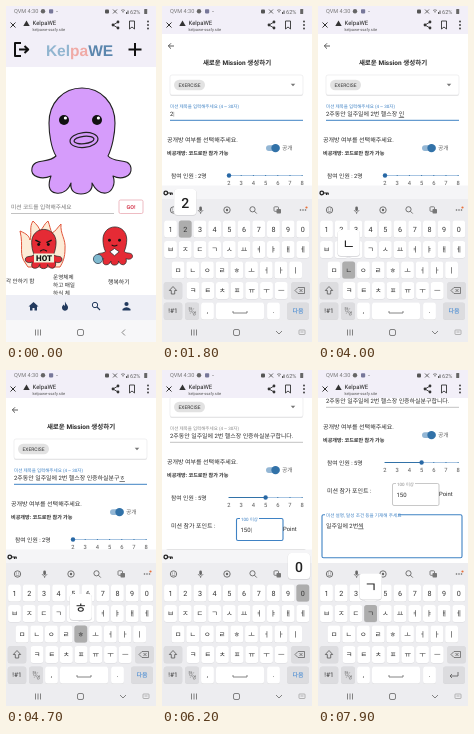
An HTML page that plays this animation: 150 by 336 pixels, repeating every 8000 ms.

```html
<!DOCTYPE html>
<html lang="ko">
<head>
<meta charset="utf-8">
<title>KelpaWE</title>
<style>
html, body { margin: 0; width: 100%; height: 100%; overflow: hidden; background: #fff; }
svg { display: block; width: 100vw; height: 100vh; }
text { font-family: Roboto, "Noto Sans CJK KR", "Noto Sans CJK", sans-serif; white-space: pre; text-rendering: geometricPrecision; }
</style>
</head>
<body>
<svg id="stage" viewBox="0 0 150 336"></svg>
<script>
const LOOP = 8000, TICK = 100;
const BLUE = '#3f82c4', NAVY = '#223a5e', GREY = '#8a8a8a', INK = '#2a2a2a';
const BAR = '#f2eff8', PANEL = '#ededf0', FUNC = '#dcdcdf';
const stage = document.getElementById('stage');

// Drawing helpers
const text = (x, y, size, str, fill = INK, extra = '') =>
  `<text x="${x}" y="${y}" font-size="${size}" fill="${fill}" ${extra}>${str}</text>`;
const mid = (x, y, size, str, fill, extra = '') => text(x, y, size, str, fill, 'text-anchor="middle" ' + extra);
const rect = (x, y, w, h, fill, r = 0, extra = '') =>
  `<rect x="${x}" y="${y}" width="${w}" height="${h}" rx="${r}" fill="${fill}" ${extra}/>`;
const dot = (x, y, r, fill, extra = '') => `<circle cx="${x}" cy="${y}" r="${r}" fill="${fill}" ${extra}/>`;
const line = (d, color = INK, w = 1, fill = 'none') =>
  `<path d="${d}" stroke="${color}" stroke-width="${w}" fill="${fill}" stroke-linejoin="round"/>`;
const shape = (d, fill) => `<path d="${d}" fill="${fill}"/>`;
const group = (x, y, body, scale = 1) => `<g transform="translate(${x} ${y}) scale(${scale})">${body}</g>`;
const BOLD = 'font-weight="700"';

// Hangul typing, one step per key press
const INITIAL = 'ㄱㄲㄴㄷㄸㄹㅁㅂㅃㅅㅆㅇㅈㅉㅊㅋㅌㅍㅎ';
const VOWEL = 'ㅏㅐㅑㅒㅓㅔㅕㅖㅗㅘㅙㅚㅛㅜㅝㅞㅟㅠㅡㅢㅣ';
const FINAL = ' ㄱㄲㄳㄴㄵㄶㄷㄹㄺㄻㄼㄽㄾㄿㅀㅁㅂㅄㅅㅆㅇㅈㅊㅋㅌㅍㅎ';

function keyPresses(str) {
  const out = [];
  let done = '';
  for (const ch of str) {
    const c = ch.charCodeAt(0) - 0xAC00;
    if (c < 0) out.push({ text: done + ch, key: ch });
    else {
      const first = INITIAL[Math.floor(c / 588)], last = c % 28;
      out.push({ text: done + first, key: first });
      out.push({ text: done + String.fromCharCode(0xAC00 + c - last), key: VOWEL[Math.floor(c % 588 / 28)] });
      if (last) out.push({ text: done + ch, key: FINAL[last] });
    }
    done += ch;
  }
  return out;
}

const script = parts => parts.map(([from, to, str]) => ({ from, to, keys: keyPresses(str) }));
const TITLE = script([
  [1800, 2500, '2주동안'],
  [2700, 4000, ' 일주일에 2번 헬스장 인'],
  [4100, 5000, '증하실분구합니다.']
]);
const POINTS = script([[5900, 6200, '150']]);
const DETAIL = script([[6800, 7900, '일주일에 2번씩']]);

function typed(t, parts) {
  let value = '', key = '';
  for (const p of parts) {
    if (t < p.from) break;
    const n = Math.floor(Math.min(1, (t - p.from) / (p.to - p.from)) * (p.keys.length - 1) + 1e-6);
    value += p.keys[n].text;
    key = t <= p.to ? p.keys[n].key : '';
  }
  return { value, key };
}

// A typed value with either its composing mark or a caret
function entry({ value, key }, focused) {
  if (!focused || !value) return value;
  return /[ㄱ-힣]/.test(key)
    ? value.slice(0, -1) + `<tspan text-decoration="underline">${value.slice(-1)}</tspan>`
    : value + '<tspan font-weight="300">|</tspan>';
}

function ramp(t, from, to) {
  const p = Math.max(0, Math.min(1, (t - from) / (to - from)));
  return p * p * (3 - 2 * p);
}

function browserBar() {
  return rect(0, 0, 150, 28, BAR) +
    text(8, 7.4, 5.6, 'QVM 4:30', '#777') + dot(37, 5.3, 2.2, '#666') + rect(43, 3.2, 4.2, 4.2, '#779', .8) +
    dot(51, 5.5, .6, '#777') +
    rect(99, 3.4, 4, 4.2, '#555', 1) + line('M107 3.5l4 4M111 3.5l-4 4', '#555', .9) +
    line('M115 4.5q2 -1.5 4 0M116 6q1 -.7 2 0', '#555', .7) + shape('M120 8v-2h1v2zM121.5 8v-3.5h1V8z', '#555') +
    text(124, 7.5, 5.6, '62%', '#666') + rect(138.2, 3, 3, 5, '#666', .6) +
    line('M4.5 16.5l5 5M9.5 16.5l-5 5', '#333', 1) +
    shape('M20.5 14.5l3.2 5.5h-6.4z', '#333') +
    text(26.5, 19, 6, 'KelpaWE', '#222') + text(26.5, 25, 4, 'kelpawe-ssafy.site', '#555') +
    line('M112 16l-5 3l5 3', '#333', .9) + dot(112, 16, 1.4, '#333') + dot(107, 19, 1.4, '#333') + dot(112, 22, 1.4, '#333') +
    line('M123.5 15h5v8l-2.5 -2l-2.5 2z', '#333', .9) +
    [15.5, 19, 22.5].map(y => dot(142, y, .9, '#333')).join('');
}

function systemBar(keyboard) {
  return rect(0, 314.5, 150, 21.5, keyboard ? PANEL : '#f7f7f9') +
    line('M29.5 323.5v6M32 323.5v6M34.5 323.5v6', '#666', .8) +
    rect(71.5, 323.5, 6, 6, 'none', 1.5, 'stroke="#666" stroke-width=".8"') +
    line(keyboard ? 'M114 325l3 3l3 -3' : 'M119 323.5l-3 3l3 3', '#666', .8) +
    (keyboard ? rect(137, 324, 6, 4.5, 'none', .6, 'stroke="#999" stroke-width=".7"') + line('M138.5 326h3', '#999', .7) : '');
}

// Body is centred on 0,0
const OCTO = 'M-25 15C-30 7-32-8-32-18C-32-38-18-53 1-53C20-53 34-38 34-18C34-7 31 7 27 15' +
  'C34 23 48 16 50 27C51 36 40 39 32 35C35 43 31 51 25 52C17 53 13 46 11 42C12 49 7 53 0 53' +
  'C-7 53-11 49-10 42C-13 50-19 53-25 52C-33 51-33 43-30 35C-39 39-51 36-49 27C-47 17-33 23-25 15Z';

function octo(x, y, scale, fill, face) {
  return group(x, y, line(OCTO, '#222', scale < 1 ? 2 : 1.1, fill) + face, scale);
}

function home() {
  const eye = x => dot(x, -21, 5, '#111') + dot(x + 1.4, -23, 1.6, '#fff');
  const ring = (rx, ry) => `<ellipse rx="${rx}" ry="${ry}" fill="none" stroke="#222" stroke-width="1.2"/>`;
  const calm = eye(-17) + eye(16) + `<g transform="translate(3 -1) rotate(-6)">${ring(14, 7.5) + ring(10, 3.7)}</g>`;
  const angry = line('M-22-24l14 7M22-24l-14 7', '#111', 4) + dot(-13, -12, 4, '#111') + dot(13, -12, 4, '#111') +
    line('M-9 6q9 -8 18 0', '#111', 3);
  const happy = dot(-14, -16, 4, '#111') + dot(14, -16, 4, '#111') + line('M-8 -3q8 6 16 0', '#111', 3) +
    line('M-13 16l13 -9l13 9l-13 11z', '#222', 2, '#fff');
  const flame = 'M20 258C12 248 18 241 14 225C21 228 23 230 24 234C26 227 23 221 27 215C31 219 33 221 34 225' +
    'C38 221 38 218 42 215C44 220 44 223 46 227C50 225 51 222 55 218C54 228 60 233 59 243C59 251 57 256 54 261H22Z';
  const word = [['Kel', '#91b5d0'], ['pa', '#f0aaa6'], ['WE', '#5b86ad']]
    .map(([s, c]) => `<tspan fill="${c}">${s}</tspan>`).join('');
  return rect(0, 28, 150, 33, BAR) + line('M15 37H9v13h6M13 43.5h9M18.5 40l3.7 3.5l-3.7 3.5', '#111', 2) +
    mid(73.5, 50, 15.5, word, INK, BOLD + ' style="font-family:\'Liberation Sans\',sans-serif"') +
    line('M129 37v13M122.5 43.5h13', '#111', 2) +
    octo(75, 135, 1, '#d69cfb', calm) +
    text(5, 202.5, 5.7, '미션 코드를 입력해주세요', '#777') + line('M5 207.5H108', '#999', .6) +
    rect(113, 194, 24, 13.5, '#fff', 1.5, 'stroke="#e7a0aa" stroke-width=".7"') + mid(125, 202.8, 5.4, 'GO!', '#d43a50', BOLD) +
    line(flame, '#e2553b', 1, '#fdebd6') + octo(37.5, 243, .37, '#e52b35', angry) +
    rect(28, 247.5, 20, 9, '#eef3dc') + mid(38, 255, 8, 'HOT', '#111', 'font-weight="900"') +
    octo(108.5, 240, .36, '#e52b35', happy) + dot(92, 253, 4.6, '#7fb9cf', 'stroke="#345" stroke-width=".8"') +
    text(0, 277, 5.6, '각 안하기 함') + text(47, 273, 5.6, '운영체제') + text(47, 281, 5.6, '하고 매일') +
    text(47, 289, 5.6, '하식 체') + text(102, 277.5, 5.9, '행복하기') +
    rect(0, 289, 150, 25.5, '#eeeff6') +
    shape('M27.5 296l-5 4.5h1.5v4h2.5v-2.5h2v2.5h2.500v-4h1.500z', NAVY) +
    shape('M59 295.5c1 3 3.500 4 3 6.500c-.5 3.500-5.500 3.500-6 0c-.2-2 1-2.500 1.500-3.500c.5 1 .8 1.200 1.200 1.200c.7-1.500 0-2.700 .3-4.200z', NAVY) +
    dot(89, 299, 2.7, 'none', `stroke="${NAVY}" stroke-width="1"`) + line('M91 301l3 3', NAVY, 1.1) +
    dot(120.5, 298, 2.1, NAVY) + shape('M116.5 304.5v-1.5q4 -3.500 8 0v1.5z', NAVY);
}

function form(t, f) {
  const people = t < 5100 ? 2 : Math.min(5, 3 + Math.floor((t - 5100) / 100));
  const shift = 42 * ramp(t, 5300, 5600) + 35 * ramp(t, 6250, 6550);
  const on = name => f.focus === name;
  const tint = name => on(name) ? BLUE : GREY;
  const knob = 67 + (people - 2) * 12.2;
  const hint = '미션 제목을 입력해주세요 (4 ~ 30자)';
  const about = '미션 설명, 달성 조건 등을 기재해 주세요';
  const outline = (name, y, box) =>
    rect(...box, '#fff', 1.5, `stroke="${on(name) ? BLUE : '#b0b0b0'}" stroke-width="${on(name) ? 1.1 : .7}"`);
  let s = line('M12 40H6.5M9 37.3l-2.7 2.7l2.7 2.7', '#333', .8) +
    mid(75, 59, 6.5, '새로운 Mission 생성하기', INK, BOLD) +
    rect(8, 70, 133, 20, '#e3e3e5', 2) + rect(8, 69, 133, 20, '#fff', 2, 'stroke="#e6e6e8" stroke-width=".6"');
  if (t >= 600) s += rect(12, 73.8, 31, 10.4, '#e2e2e2', 5.2) + mid(27.5, 80.8, 4.9, 'EXERCISE', '#333');
  s += shape('M128.7 77.8h4.6l-2.3 2.5z', t < 1300 ? BLUE : '#777');
  s += on('title') || f.title.value
    ? text(8, 101.7, 4.5, hint, tint('title')) + text(8, 110.4, 5.95, entry(f.title, on('title')))
    : text(8, 109, 5.95, hint, GREY);
  s += line('M8 114.3H141', on('title') ? BLUE : '#999', on('title') ? 1 : .6) +
    text(5, 136.2, 6, '공개방 여부를 선택해주세요.') +
    text(5, 149, 5.1, '비공개방: 코드로만 참가 가능', INK, BOLD) +
    rect(104, 139.2, 14, 5.8, '#94b7d5', 2.9) + dot(113.5, 142.1, 4.2, '#3272a8') + text(120, 144.3, 5.8, '공개', '#666') +
    text(9, 172.2, 5.8, `참여 인원 : ${people}명`) +
    line('M67 169.5H140.2', '#9fbfdf', .9) + line(`M67 169.5H${knob}`, '#3272a8', 1);
  for (let i = 2; i <= 8; i++) {
    const x = 67 + (i - 2) * 12.2;
    s += dot(x, 169.5, .6, '#3272a8') + mid(x, 179, 5.8, i, '#555');
  }
  s += dot(knob, 169.5, 2.2, '#2868a5') +
    text(9, 200.3, 6, '미션 참가 포인트 :') +
    outline('points', 0, [74.5, 190.5, 46.5, 22]) + text(121, 203, 5.9, 'Point');
  s += on('points') || f.points.value
    ? rect(78, 189, 19, 3, '#fff') + text(79, 192.8, 4.5, '100 이상', tint('points')) +
      text(78.5, 204, 6, entry(f.points, on('points')))
    : text(79, 204, 5.9, '100 이상', GREY);
  s += outline('detail', 0, [4, 221.7, 140, 43]);
  s += on('detail')
    ? rect(7, 220, 73, 3.5, '#fff') + text(8, 223.6, 4.6, about, BLUE) + text(8, 234.6, 5.95, entry(f.detail, true))
    : text(8, 234.6, 5.8, about, GREY);
  return group(0, -shift, s);
}

const LATIN = ['1234567890', 'qwertyuiop', 'asdfghjkl', 'zxcvbnm'];
const HANGUL = ['1234567890', 'ㅂㅈㄷㄱㅅㅛㅕㅑㅐㅔ', 'ㅁㄴㅇㄹㅎㅗㅓㅏㅣ', 'ㅋㅌㅊㅍㅠㅜㅡ'];
const DOUBLES = { ㅆ: 'ㅅ', ㄲ: 'ㄱ', ㄸ: 'ㄷ', ㅃ: 'ㅂ', ㅉ: 'ㅈ' };
const ROW_X = [8.5, 8.5, 16, 31], ROW_Y = [223, 243.5, 264, 284.5];

function toolbar() {
  const ring = (x, r = 3.2) => dot(x, 204, r, 'none', 'stroke="#666" stroke-width=".9"');
  return ring(11.5) + line('M9.8 204.8q1.7 1.8 3.4 0', '#666', .7) + dot(10.3, 203, .5, '#666') + dot(12.7, 203, .5, '#666') +
    rect(37.3, 200.5, 2.6, 4.6, '#666', 1.3) + line('M36 204q2.6 4.5 5.2 0M38.6 206v2', '#666', .7) +
    ring(65) + dot(65, 204, 1.2, '#666') +
    dot(90.5, 203.3, 2.6, 'none', 'stroke="#666" stroke-width=".9"') + line('M92.4 205.2l2.4 2.4', '#666', .9) +
    rect(112, 200.8, 4.5, 4.5, 'none', .8, 'stroke="#666" stroke-width=".8"') + rect(114.5, 203, 4.5, 4.5, '#777', .8) +
    [138.5, 141, 143.5].map(x => dot(x, 204, .8, '#666')).join('') + dot(144.5, 201.5, 1.1, '#e8703a');
}

const passwordBar = () => rect(0, 179.5, 150, 14, '#f5f5f7') +
  dot(3.8, 187, 1.8, 'none', 'stroke="#222" stroke-width="1.3"') + line('M5.5 187h5M8.5 187v2M10.2 187v1.8', '#222', 1.2);

function keyboard(t, pressed, multiline) {
  const key = (x, y, w, fill = '#fff') => rect(x - w / 2, y - 8.3, w, 17.3, '#d8d8db', 2.5) + rect(x - w / 2, y - 8.5, w, 17, fill, 2.5);
  const base = DOUBLES[pressed] || pressed;
  let s = (multiline ? '' : passwordBar()) + rect(0, 193, 150, 122, PANEL) + toolbar();
  let popup = '';
  (t < 1600 ? LATIN : HANGUL).forEach((row, r) => [...row].forEach((ch, i) => {
    const x = ROW_X[r] + i * 14.7, y = ROW_Y[r], hit = ch === base;
    s += key(x, y, 12.8, hit ? '#adadad' : '#fff') + mid(x, y + 2.6, 7.2, ch, '#333');
    if (hit) {
      const px = Math.max(13, Math.min(137, x));
      popup = rect(px - 11.2, y - 39.8, 22.4, 26.5, '#d0d0d3', 3.5) + rect(px - 11, y - 40, 22, 26, '#fff', 3.5) +
        mid(px, y - 21.5, 14, pressed, '#222', 'font-weight="500"');
    }
  }));
  s += key(11, 284.5, 18.5, FUNC) + line('M11 280.5l-3.7 4h2v3.5h3.4v-3.5h2z', '#555', .8) +
    key(138.5, 284.5, 18.5, FUNC) + line('M136 281.5h6.5v6h-6.5l-3 -3zM137.5 283l3 3M140.5 283l-3 3', '#555', .7) +
    key(11, 305, 18.5, FUNC) + mid(11, 307.4, 6.5, '!#1', '#333') +
    key(30, 305, 14, FUNC) + mid(28.3, 304.5, 4.5, '한', '#555') + mid(32, 309, 4.5, '영', '#555') + line('M28 308l4 -6', '#777', .4) +
    key(45.5, 305, 12.8) + mid(45.5, 307, 7, ',', '#333') +
    key(78, 305, 48) + line('M71 305v2h14v-2', '#666', .8) +
    key(111.5, 305, 12.8) + mid(111.5, 307, 7, '.', '#333') +
    key(136, 305, 22, FUNC) +
    (multiline ? line('M140 302v4h-8M134 304l-2 2l2 2', '#555', .8) : mid(136, 307.3, 6, '다음', '#2a7bd0'));
  return s + popup;
}

function focusAt(t) {
  if (t >= 6400) return 'detail';
  if (t >= 5800) return 'points';
  return t >= 1300 ? 'title' : '';
}

function scene(t) {
  const f = { focus: focusAt(t), title: typed(t, TITLE), points: typed(t, POINTS), detail: typed(t, DETAIL) };
  const open = t >= 800;
  const pressed = f.focus ? f[f.focus].key : '';
  return rect(0, 0, 150, 336, '#fff') + (t < 300 ? home() : form(t, f)) + browserBar() +
    (open ? keyboard(t, pressed, f.focus === 'detail') : '') + systemBar(open);
}

const start = performance.now();
let shown = -1;
function draw() {
  const t = Math.floor((performance.now() - start) % LOOP / TICK) * TICK;
  if (t !== shown) {
    shown = t;
    stage.innerHTML = scene(t);
  }
  requestAnimationFrame(draw);
}
draw();
</script>
</body>
</html>
```
